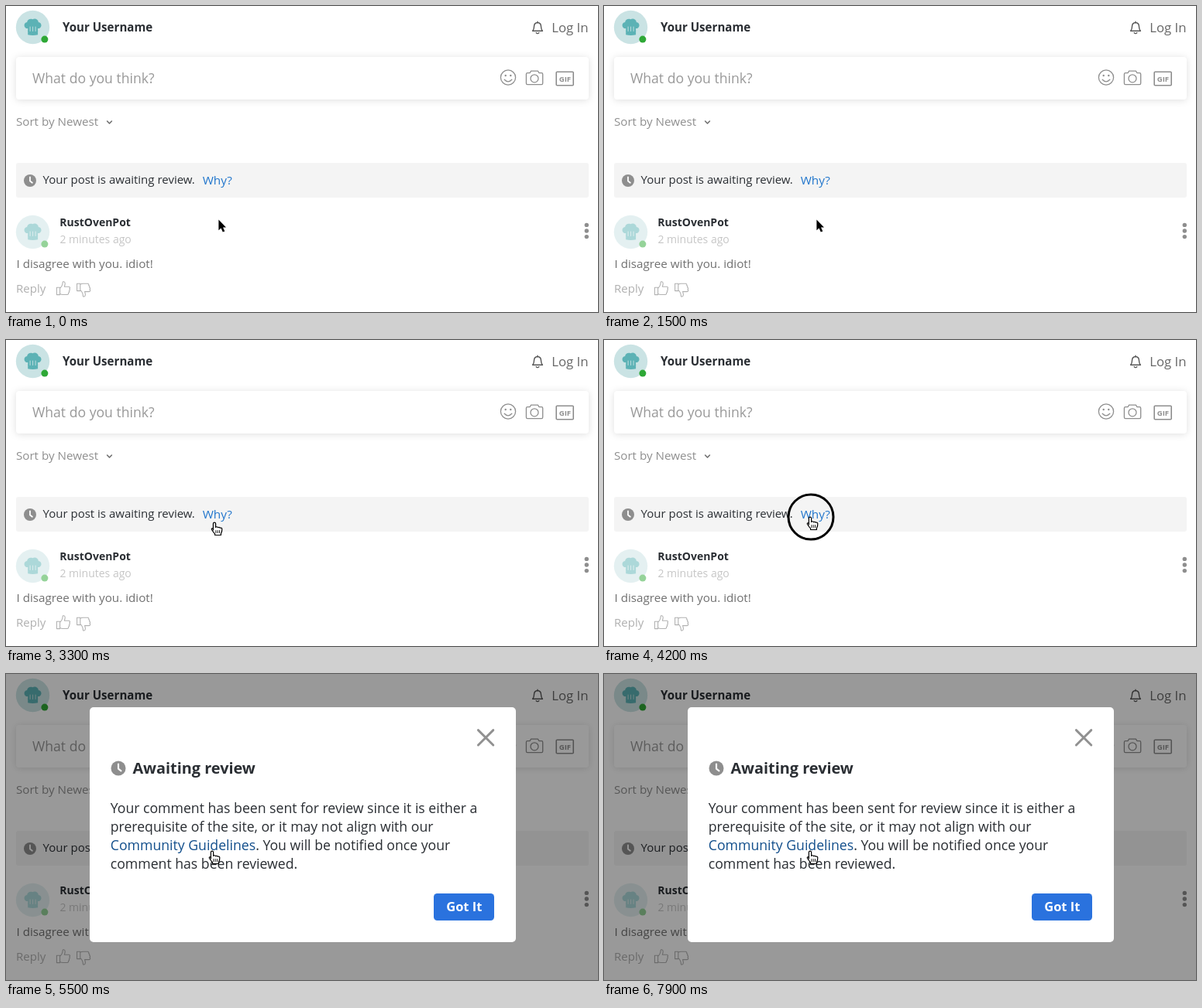
These frames come from a looping animation (764 px wide and 396 px high, 8000 ms). An HTML page:

```html
<!DOCTYPE html>
<html lang="en">
<head>
<meta charset="utf-8">
<title>Comment awaiting review</title>
<style>
  html, body { margin: 0; width: 100%; height: 100%; overflow: hidden; background: #fff; }
  svg { display: block; width: 764px; height: 396px; }
  text { font-family: "Open Sans", "Noto Sans", sans-serif; white-space: pre; }
  .b { font-weight: 700; }
  .dark { fill: #2a2e33; }
  .line { fill: none; stroke-linecap: round; stroke-linejoin: round; }
  .card { filter: drop-shadow(0 1px 5px rgba(0, 0, 0, .13)); }
  .body { font-size: 17.65px; }
</style>
</head>
<body>
<svg viewBox="0 0 764 396">
  <defs>
    <g id="avatar">
      <circle r="21.7" fill="#cae3e4"/>
      <g fill="#5cb2b5">
        <path d="M-6.3 5.2V1.6C-12 1.8-12.4-6-7.4-6.6C-6.6-10.3-3-11.4-.3-10.2C3-12.2 7-10.2 7.4-6.6C12.8-5.8 12 1.8 6.6 1.6V5.2Z"/>
        <path d="M-6.3 4.5H6.6V9.8Q0 11.4-6.3 9.8Z"/>
      </g>
      <path class="line" d="M-3.4-.5V5M.1-.5V5M3.6-.5V5" stroke="#cae3e4" stroke-width=".9"/>
      <circle cx="15.4" cy="15.6" r="4.5" fill="#2ea836"/>
    </g>
    <g id="clock">
      <circle r="8" fill="#8e8e8e"/>
      <path class="line" d="M0-4.6V.5L2.9 2.8" stroke="#fff" stroke-width="1.8"/>
    </g>
    <path id="thumb" class="line" stroke="#b2b2b2" stroke-width="1.1"
      d="M.6 8.2H4.8V17.6H.6ZM4.8 9.2C7 7.4 8.2 5.2 8.4 1.5C8.6.2 11.3.4 11.4 3C11.4 4.8 11 6 10.6 7.2H16.2C18 7.3 18.2 9.2 17 10C18 10.8 17.7 12.3 16.5 12.7C17.2 13.7 16.8 14.9 15.7 15.2C16.2 16.4 15.5 17.4 14.3 17.5H8.4Q6.5 17.5 4.8 16.5"/>
  </defs>

  <rect width="764" height="396" fill="#fff"/>

  <use href="#avatar" x="34.5" y="27.5"/>
  <text class="b dark" x="73" y="32.8" font-size="15.1">Your Username</text>
  <g class="line" stroke="#555" stroke-width="1.4">
    <path d="M679.6 32.2C681.5 30.2 681.4 28.6 681.5 26.4C681.6 23.2 683.4 21.6 686 21.5C688.6 21.6 690.4 23.2 690.5 26.4C690.6 28.6 690.5 30.2 692.4 32.2ZM686 21.4V20.2M684.2 34.6Q686 36.6 687.8 34.6"/>
  </g>
  <text x="704.2" y="34" font-size="16.8" fill="#666">Log In</text>

  <rect class="card" x="13" y="66" width="739" height="55" rx="4" fill="#fff"/>
  <text x="34" y="100" font-size="17.6" fill="#999">What do you think?</text>
  <g class="line" stroke="#8e8e8e" stroke-width="1.3">
    <circle cx="648" cy="92.5" r="9.6"/>
    <path d="M643.2 95.2Q648 100.4 652.8 95.2"/>
    <path d="M672.9 86.6H676L677.6 84.2H686.4L688 86.6H691.2Q692.7 86.6 692.7 88.2V100Q692.7 101.6 691.2 101.6H672.9Q671.4 101.6 671.4 100V88.2Q671.4 86.6 672.9 86.6Z"/>
    <circle cx="682" cy="93.8" r="5"/>
    <rect x="710.2" y="85.2" width="22" height="17.6" rx="1" stroke-width="1.6"/>
  </g>
  <circle cx="644.7" cy="90" r="1.2" fill="#8e8e8e"/>
  <circle cx="651.3" cy="90" r="1.2" fill="#8e8e8e"/>
  <text class="b" x="721.4" y="97.7" font-size="9.6" fill="#8e8e8e" text-anchor="middle">GIF</text>

  <text x="12.9" y="155" font-size="15.2" fill="#8f8f8f">Sort by Newest</text>
  <path class="line" d="M130.6 149L133.5 152L136.4 149" stroke="#707070" stroke-width="1.6"/>

  <rect x="13" y="203" width="739" height="45" rx="3" fill="#f4f4f4"/>
  <use href="#clock" x="31" y="226"/>
  <text class="dark" x="47.5" y="230.2" font-size="15">Your post is awaiting review.</text>
  <text x="253.7" y="231" font-size="15.3" fill="#2276cc">Why?</text>

  <use href="#avatar" x="34.5" y="292.5" opacity=".5"/>
  <text class="b dark" x="69.3" y="285" font-size="14">RustOvenPot</text>
  <text x="69.4" y="307" font-size="14" fill="#c6c6c6">2 minutes ago</text>
  <g fill="#8e8e8e">
    <circle cx="749.3" cy="283.4" r="2.7"/>
    <circle cx="749.3" cy="291" r="2.7"/>
    <circle cx="749.3" cy="298.6" r="2.7"/>
  </g>
  <text x="13.5" y="339" font-size="15.2" fill="#707070">I disagree with you. idiot!</text>
  <text x="13" y="371" font-size="15.1" fill="#b0b0b0">Reply</text>
  <use href="#thumb" x="64.8" y="356"/>
  <use href="#thumb" transform="translate(91 376.8) scale(1 -1)"/>

  <g id="dialog" visibility="hidden">
    <rect width="764" height="396" opacity=".4"/>
    <rect x="108" y="43" width="550" height="304" rx="5" fill="#fff"/>
    <path class="line" d="M609.4 72.6L628.8 92M628.8 72.6L609.4 92" stroke="#919191" stroke-width="2.9"/>
    <use href="#clock" transform="translate(145 122) scale(1.19)"/>
    <text class="b dark" x="163.4" y="129" font-size="19.85">Awaiting review</text>
    <g class="body dark">
      <text x="134.8" y="180">Your comment has been sent for review since it is either a</text>
      <text x="134.8" y="204">prerequisite of the site, or it may not align with our</text>
      <text x="134.8" y="228"><tspan fill="#134f8c">Community Guidelines</tspan>. You will be notified once your</text>
      <text x="134.8" y="252">comment has been reviewed.</text>
    </g>
    <rect x="552" y="284" width="78" height="35" rx="4.5" fill="#2a72de"/>
    <text class="b" x="568.2" y="307" font-size="16.5" fill="#fff">Got It</text>
  </g>

  <circle id="ring" class="line" cx="267" cy="229" r="29" stroke="#000" stroke-width="3" visibility="hidden"/>

  <g id="arrow">
    <path d="M.4.4V14.2L3.5 11.4L5.8 16.6L8.3 15.5L6 10.5H10Z" fill="#000" stroke="#fff" stroke-width="1" paint-order="stroke"/>
  </g>
  <g id="hand" visibility="hidden">
    <path class="line" style="fill:#fff" stroke="#000" stroke-width="1.2"
      d="M-1.6 10V1.8A1.6 1.6 0 0 1 1.6 1.8V6.4Q3.1 5 4.5 6.7Q6.1 5.7 7.3 7.2Q9.6 6.7 9.8 8.8C9.9 12 9.3 12.8 8.4 14.6V16.5H.6V14.9C-.8 13.4-2.4 11.2-3.6 9.2C-4.1 7.9-2.6 7.2-1.6 8.5Z"/>
    <path class="line" d="M1.9 10.6V13.6M4.2 10.6V13.6M6.5 10.6V13.6" stroke="#000" stroke-width=".9"/>
  </g>
</svg>
<script>
  const LOOP = 8000, STEP = 100;
  const CLICK = 4000, OPEN = 4300, HOVER = 3200;

  // time, x, y of the pointer tip
  const path = [
    [0, 274, 276], [2900, 274, 276], [3000, 274, 273], [3100, 273, 258],
    [3200, 270.5, 243], [3300, 269, 236], [3400, 267.5, 232.5],
    [3500, 266.4, 230], [3700, 266, 229], [LOOP, 266, 229]
  ];

  const $ = id => document.getElementById(id);
  const dialog = $("dialog"), ring = $("ring"), arrow = $("arrow"), hand = $("hand");
  const show = (el, on) => el.setAttribute("visibility", on ? "visible" : "hidden");

  function pointer(t) {
    const i = path.findIndex(p => p[0] > t);
    const [t0, x0, y0] = path[i - 1], [t1, x1, y1] = path[i];
    const k = (t - t0) / (t1 - t0);
    return [x0 + (x1 - x0) * k, y0 + (y1 - y0) * k];
  }

  function draw(t) {
    const [x, y] = pointer(t);
    for (const el of [arrow, hand]) el.setAttribute("transform", `translate(${x} ${y})`);
    show(arrow, t < HOVER);
    show(hand, t >= HOVER);
    show(ring, t >= CLICK && t < OPEN);
    ring.setAttribute("r", Math.max(0, Math.min(29, 11 + (t - CLICK) * 0.09)));
    show(dialog, t >= OPEN);
  }

  const start = performance.now();
  function tick() {
    const t = (performance.now() - start) % LOOP;
    draw(Math.floor(t / STEP) * STEP);
    requestAnimationFrame(tick);
  }
  tick();
</script>
</body>
</html>
```
